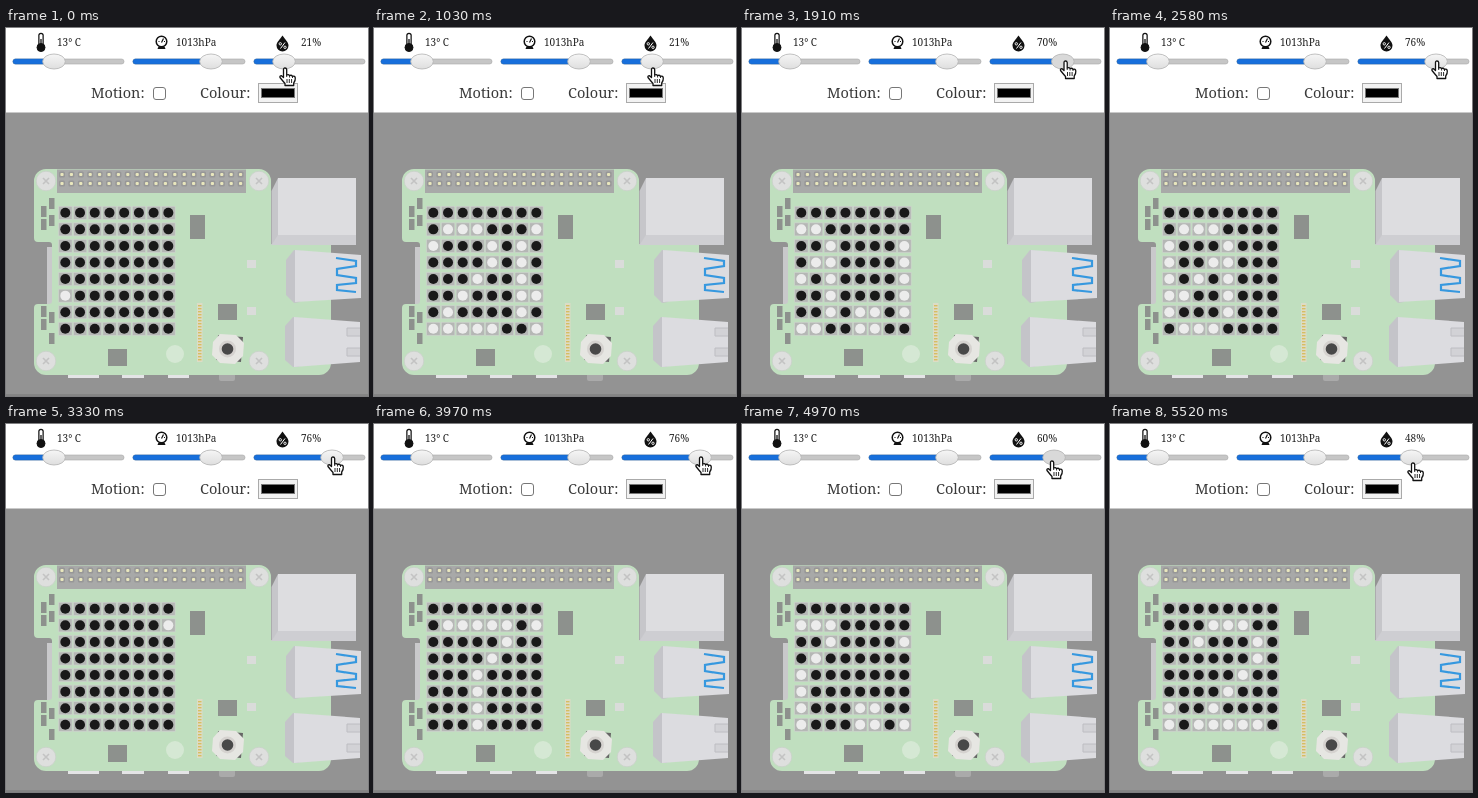
An HTML page that plays this animation: 362 by 368 pixels, repeating every 5.58 s.

```html
<!DOCTYPE html>
<html lang="en">
<head>
<meta charset="utf-8">
<title>LED board humidity</title>
<style>
  html, body { margin: 0; width: 100%; height: 100%; overflow: hidden; background: #fff; }
  svg { display: block; width: 362px; height: 368px; }
  text { font-family: "Noto Serif", "Liberation Serif", serif; fill: #222; }
  .small { font-size: 10px; }
  .label { font-size: 14.5px; fill: #3a3a3a; }
</style>
</head>
<body>
<svg id="stage" viewBox="0 0 362 368">
  <defs>
    <linearGradient id="thumbFill" x2="0" y2="1">
      <stop stop-color="#f6f6f6"/><stop offset="1" stop-color="#dedede"/>
    </linearGradient>
  </defs>
  <rect width="362" height="368" fill="#fff"/>
  <rect y="84.500" width="362" height="283.500" fill="#939393"/>
  <path d="M0 367H362" stroke="#777"/>

  <!-- readings -->
  <g fill="none" stroke="#111">
    <path d="M35 7.500v9" stroke-width="5.500" stroke-linecap="round"/>
    <path d="M35 7.500v10" stroke="#fff" stroke-width="3" stroke-linecap="round"/>
    <path d="M35 11v8" stroke-width="1.300"/>
    <circle cx="35" cy="19.500" r="4" fill="#111"/>
    <circle cx="155.500" cy="13.500" r="5.300" stroke-width="1.500"/>
    <path d="M155.500 14.500l2-4M152.500 13.500h1M158 13.500h1" stroke-width="1.200"/>
    <path d="M151.500 21l1-2.500h6l1 2.500z" fill="#111" stroke="none"/>
    <path d="M276.500 7.500C273.500 12 270.500 14 270.500 17.600a6 6 0 0 0 12 0C282.500 14 279.500 12 276.500 7.500z" fill="#111" stroke="none"/>
    <path d="M274.500 20.500l4.500-6" stroke="#fff"/>
    <circle cx="274.300" cy="15.800" r="1.200" stroke="#fff" stroke-width=".9"/>
    <circle cx="279" cy="19.300" r="1.200" stroke="#fff" stroke-width=".9"/>
  </g>
  <text class="small" x="51" y="18">13° C</text>
  <text class="small" x="170" y="18">1013hPa</text>
  <text class="small" x="295" y="18" id="reading">21%</text>
  <g id="sliders"></g>
  <text class="label" x="85" y="70">Motion:</text>
  <rect x="147.500" y="59.500" width="12" height="12" rx="2.500" fill="#fff" stroke="#777"/>
  <text class="label" x="194" y="70">Colour:</text>
  <rect x="252.500" y="55.500" width="39" height="19" fill="#f2f2f2" stroke="#aaa"/>
  <rect x="255.500" y="60.500" width="33" height="9" stroke="#777"/>

  <!-- circuit board -->
  <path d="M62 350V346H93V350zM116 350V346H138V350zM162 350V346H183V350z" fill="#e4e4e6"/>
  <rect x="213" y="344" width="16" height="9" rx="2" fill="#aaa"/>
  <rect x="41" y="219" width="7" height="57" fill="#c9c9cb"/>
  <path d="M40 141H253a12 12 0 0 1 12 12V216H325V335a12 12 0 0 1-12 12H40a12 12 0 0 1-12-12V280q0-4 4-4H43q3 0 3-3V217q0-3-3-3H32q-4 0-4-4V153a12 12 0 0 1 12-12z" fill="#c0dfbf"/>
  <g id="parts"></g>
  <circle cx="169" cy="326" r="9" fill="#d5e8d4"/>

  <!-- joystick -->
  <path d="M212 307l25 2-2 25-25-2z" fill="#666"/>
  <path d="M214 306l16 1 8 8-1 13-8 8-15-1-8-8 1-13z" fill="#e6e6e2"/>
  <circle cx="221.500" cy="321" r="8.500" fill="#d5d2cf"/>
  <circle cx="221.500" cy="321" r="5.800" fill="#484848"/>

  <!-- ports -->
  <path d="M265.500 163L272 150H350V217H265.500z" fill="#c6c6ca"/>
  <path d="M272 150H350V207H272z" fill="#dddde0"/>
  <path d="M265.500 217L272 207H350V217z" fill="#ceced2"/>
  <path d="M280 232L288 222L294 223V274L288 275L280 267z" fill="#c4c4c9"/>
  <path d="M289 222L355 227V270L289 274z" fill="#dcdce0"/>
  <path d="M330 230L350 233V238L331 241V247L350 250V255L331 257V262L350 264" fill="none" stroke="#3698df" stroke-width="2.200"/>
  <path d="M279 298L287 289L293 290V339H287L279 332z" fill="#c4c4c9"/>
  <path d="M288 289L354 294V334L288 339z" fill="#dcdce0"/>
  <path d="M354 300h-13v8h13M354 320h-13v8h13" fill="#d2d2d6" stroke="#bdbdc2"/>

  <g id="leds"></g>

  <g id="hand">
    <path d="M-1.500 1.500Q-1.500 0 0 0T1.700 1.500V7Q3.500 6 4.500 7.500 6.500 6.700 7.500 8.300 10 7.500 10.300 10 10.500 13 8.700 15V17.500H0V15.500Q-3 12-5 9.500-5.500 7.700-3.500 7.700L-1.500 9.500z" fill="#fff" stroke="#111" stroke-width="1.300" stroke-linejoin="round"/>
    <path d="M2 11v4M4.300 11v4M6.600 11v4M1.700 7v2M4.600 8v1.500M7.500 8.500v1.500" stroke="#111" stroke-width=".9"/>
  </g>
</svg>
<script>
const LOOP = 5580, STEP = 109;
const byId = id => document.getElementById(id);

function add(parent, tag, attrs) {
  const node = document.createElementNS("http://www.w3.org/2000/svg", tag);
  for (const name in attrs) node.setAttribute(name, attrs[name]);
  parent.appendChild(node);
  return node;
}

const box = (parent, x, y, width, height, fill, more) =>
  add(parent, "rect", { x, y, width, height, fill, ...more });

function slider(left, right, at) {
  const group = byId("sliders"), edge = { rx: 2.5, "stroke-width": 0.6 };
  box(group, left, 31, right - left, 5, "#c6c6c6", { ...edge, stroke: "#a8a8a8" });
  const bar = box(group, left, 31, at - left, 5, "#176fdc", { ...edge, stroke: "#1c65ba" });
  const thumb = add(group, "ellipse", {
    cx: at, cy: 33.5, rx: 11.3, ry: 7.5, fill: "url(#thumbFill)", stroke: "#b2b2b2", "stroke-width": 0.8
  });
  return { left, bar, thumb };
}

function buildParts() {
  const parts = byId("parts");
  box(parts, 51, 141.5, 189, 23.5, "#a8a9a8");
  for (let i = 0; i < 40; i++) {
    const x = 56 + (i % 20) * 9.4, y = i < 20 ? 146.5 : 155.5;
    box(parts, x - 3, y - 3, 6, 6, "#979797", { rx: 1.5 });
    box(parts, x - 1.6, y - 1.6, 3.2, 3.2, "#e9e7bd", { rx: 1 });
  }
  for (const [x, y] of [[40, 153], [253, 153], [40, 333], [253, 333]]) {
    add(parts, "circle", { cx: x, cy: y, r: 9.8, fill: "#dedfde", stroke: "#cbd2cb", "stroke-width": 0.8 });
    add(parts, "path", { d: `M${x - 3} ${y - 3}l6 6m0-6l-6 6`, stroke: "#c3c3c3", "stroke-width": 1.6 });
  }
  for (const [x, y, w, h] of [[184, 187, 15, 24], [102, 321, 19, 17], [212, 276, 19, 16]])
    box(parts, x, y, w, h, "#8d918d");
  for (const [x, y] of [[35, 178], [43, 170], [35, 191], [43, 187], [35, 278], [43, 284], [35, 291], [43, 305]])
    box(parts, x, y, 5.5, 11, "#8d918d");
  for (const y of [232, 279]) box(parts, 241, y, 9, 8, "#dadcda");
  box(parts, 191, 275, 5.5, 59, "#dcdcc6");
  for (let y = 277; y < 333; y += 3) box(parts, 192, y, 3.5, 1.4, "#d8bd62");
}

// Rows of each glyph as bit masks after its width, leftmost pixel in the highest bit.
const GLYPHS = {
  "0": [5, 14, 17, 19, 21, 25, 17, 14],
  "2": [5, 14, 17, 1, 2, 4, 8, 31],
  "4": [5, 2, 6, 10, 18, 31, 2, 2],
  "7": [5, 31, 1, 2, 4, 4, 4, 4],
  ".": [2, 0, 0, 0, 0, 0, 3, 3]
};

function columns(text) {
  const out = [];
  for (const char of text) {
    const [width, ...rows] = GLYPHS[char];
    for (let bit = width - 1; bit >= 0; bit--) out.push([0, ...rows.map(row => row >> bit & 1)]);
    out.push([]);
  }
  return out;
}

// "start" is when the first column enters at the right edge.
const messages = [
  { start: 15 - 12 * STEP, cols: columns("4") },
  { start: 182, cols: columns("20.0") },
  { start: 3315, cols: columns("77.2") }
];

function buildLeds() {
  const group = byId("leds"), lamps = [];
  for (let row = 0; row < 8; row++)
    for (let col = 0; col < 8; col++) {
      const cx = 59.3 + col * 14.72, cy = 184.8 + row * 16.57;
      box(group, cx - 6.6, cy - 6.5, 13.4, 13, "#b5b7b5", { stroke: "#cfd3cf", "stroke-width": 0.6 });
      lamps.push(add(group, "circle", { cx, cy, r: 5 }));
    }
  return lamps;
}

// Time, humidity, hand x, hand y
const KEYS = [
  [0, 21, 279, 40], [1400, 21, 279, 40], [1730, 60, 313, 35], [1910, 70, 323.5, 33],
  [2150, 76, 327, 33], [4580, 76, 327, 33], [4970, 60, 310, 37], [5450, 48, 303, 39], [LOOP, 48, 303, 39]
];

function pose(t) {
  const i = KEYS.findIndex((key, n) => n && t <= key[0]);
  const a = KEYS[i - 1], b = KEYS[i], k = (t - a[0]) / (b[0] - a[0]);
  return a.map((value, n) => value + (b[n] - value) * k);
}

buildParts();
slider(7, 118, 48);
slider(127, 239, 205);
const humidity = slider(248, 359, 278);
const lamps = buildLeds();

function draw(t) {
  const [, value, handX, handY] = pose(t);
  const percent = Math.round(value), at = 259.7 + percent * 0.873;
  const dragging = t > 1380 && t < 2300 || t > 4550 && t < 5430;
  byId("reading").textContent = percent + "%";
  humidity.bar.setAttribute("width", at - humidity.left);
  humidity.thumb.setAttribute("cx", at);
  humidity.thumb.setAttribute("fill", dragging ? "#d9d9d9" : "url(#thumbFill)");
  byId("hand").setAttribute("transform", `translate(${handX} ${handY})`);

  const { start, cols } = messages.filter(m => m.start <= t).pop();
  const shift = Math.floor((t - start) / STEP) - 7;
  lamps.forEach((lamp, i) => {
    const column = cols[shift + i % 8] || [];
    lamp.setAttribute("fill", column[i >> 3] ? "#ececec" : "#191919");
  });
}

const begin = performance.now();
function frame() {
  draw((performance.now() - begin) % LOOP);
  requestAnimationFrame(frame);
}
draw(0);
requestAnimationFrame(frame);
</script>
</body>
</html>
```
